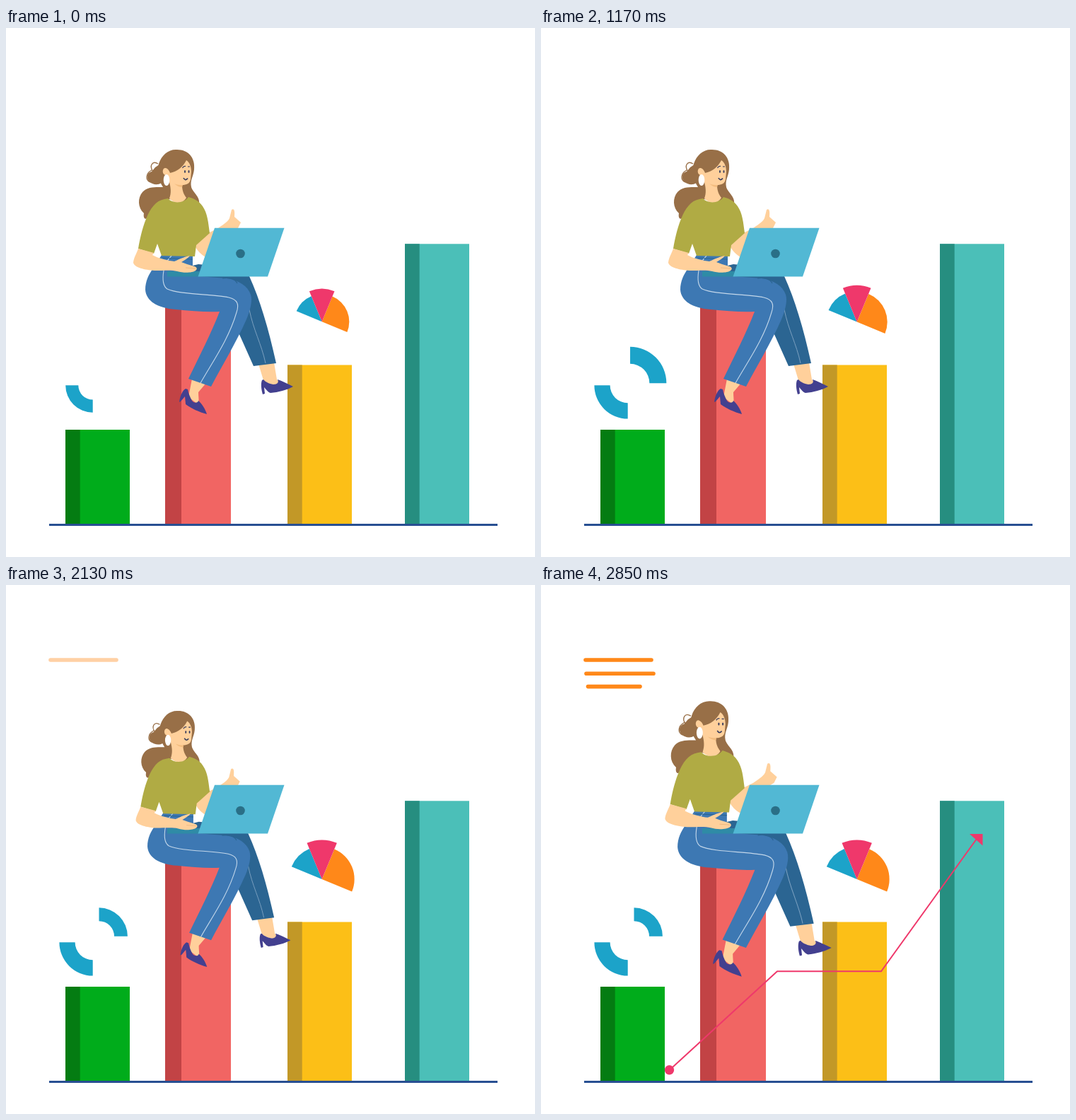
An HTML page with a canvas for the animation above (2.91 s loop, 748 by 748 pixels).

```html
<!DOCTYPE html>
<html lang="en">
<head>
<meta charset="utf-8">
<title>Growth chart</title>
<style>
html, body { margin: 0; width: 100%; height: 100%; overflow: hidden; background: #fff; }
canvas { display: block; }
</style>
</head>
<body>
<canvas id="stage" width="748" height="748"></canvas>
<script>
const ctx = document.getElementById('stage').getContext('2d');
const LOOP = 2910, STEP = 30, TAU = Math.PI * 2, DEG = Math.PI / 180;
const SKIN = '#ffd09b', HAIR = '#986f47', SHIRT = '#b0ab44', JEANS = '#3d78b3',
  DENIM = '#2b6592', SHOE = '#43408f', INK = '#34395c',
  BLUE = '#1ca3c9', PINK = '#ef386b', ORANGE = '#ff8819';

const clamp = v => Math.min(1, Math.max(0, v));
const ramp = (t, a, b) => clamp((t - a) / (b - a));

// Piecewise linear value through [time, value] points.
function track(t, keys) {
  const i = keys.findIndex(k => k[0] > t);
  if (i < 0) return keys[keys.length - 1][1];
  if (i === 0) return keys[0][1];
  const [[t0, v0], [t1, v1]] = [keys[i - 1], keys[i]];
  return v0 + (v1 - v0) * (t - t0) / (t1 - t0);
}

function rect(color, x, y, x2, y2) {
  ctx.fillStyle = color;
  ctx.fillRect(x, y, x2 - x, y2 - y);
}
function shape(color, d) {
  ctx.fillStyle = color;
  ctx.fill(new Path2D(d));
}
function stroke(color, width, d) {
  ctx.strokeStyle = color;
  ctx.lineWidth = width;
  ctx.stroke(new Path2D(d));
}
function oval(color, x, y, rx, ry = rx) {
  ctx.fillStyle = color;
  ctx.beginPath();
  ctx.ellipse(x, y, rx, ry, 0, 0, TAU);
  ctx.fill();
}
function zoom(x, y, scale, angle, draw) {
  ctx.save();
  ctx.translate(x, y);
  ctx.rotate(angle * DEG);
  ctx.scale(scale, scale);
  draw();
  ctx.restore();
}

// Ring or pie slice around the local origin; angles in degrees, blur softens its ends.
function slice(color, r0, r1, from, to, blur = 0) {
  const a = (from - blur) * DEG, b = (to + blur) * DEG;
  ctx.beginPath();
  ctx.arc(0, 0, r1, a, b);
  ctx.arc(0, 0, r0, b, a, true);
  ctx.closePath();
  ctx.fillStyle = color;
  if (blur) {
    const g = ctx.createConicGradient(a, 0, 0), span = to - from;
    g.addColorStop(0, color + '00');
    g.addColorStop(2 * blur / 360, color);
    g.addColorStop(span / 360, color);
    g.addColorStop((span + 2 * blur) / 360, color + '00');
    ctx.fillStyle = g;
  }
  ctx.fill();
}

function bar(x, y, side, dark, light) {
  rect(light, x, y, x + side.w, 702);
  rect(dark, x, y, x + side.d, 702);
}

function legs() {
  shape(SKIN, 'M357 475L379 473L383 497L388 501C384 506 373 506 364 498Z');
  shape(SHOE, 'M362 498C360 503 361 511 363 518L366 517L365 508C368 511 370 515 374 516C385 515 397 512 406 507C398 503 390 499 384 497C386 501 384 504 378 504C372 503 366 500 364 497Z');
  shape(DENIM, 'M264 336L272 334L282 335L344 351C359 384 371 424 382 474L350 478L329 431L300 380L264 352Z');
  stroke('#7ba0c0', 1, 'M344 398C350 428 361 446 367 474');
  shape(SKIN, 'M263 496L283 502L272 515C272 525 274 528 270 531L258 522Z');
  shape(SHOE, 'M254 510C250 512 246 520 245 529L247 528L253 521L254 532C262 538 273 543 284 546C282 539 277 531 272 527C271 531 265 530 263 527C260 522 258 516 257 511Z');
  shape(JEANS, 'M220 321L264 322L264 336L272 351L312 354C330 357 342 365 346 377C349 386 345 400 340 412C325 446 305 478 290 507L258 496C274 463 290 432 302 401C283 402 262 400 240 398C214 396 198 386 197 370C197 358 202 348 208 340Z');
  stroke(DENIM, 1.2, 'M306 354C316 352 324 355 327 361');
  stroke('#c3d7ea', 1.1, 'M234 322C228 328 224 335 223 343C221 355 222 365 228 369C245 377 290 376 315 381C327 384 330 390 326 402C315 440 292 472 275 502');
  stroke(DENIM, 1.2, 'M221 325L264 327');
}

function body() {
  shape(SKIN, 'M288 289L267 308C271 316 276 320 282 324L296 302L328 283L332 275L323 267C324 257 322 255 319 257L316 269C313 275 305 279 300 283Z');
  shape(HAIR, 'M240 172C256 171 268 182 266 200C265 210 260 215 262 225C265 234 275 238 273 250L255 246L230 242L205 258C201 274 193 272 195 262C186 254 186 240 193 232C200 224 212 225 222 225C215 215 213 200 216 192C220 180 229 172 240 172Z');
  shape(HAIR, 'M217 193L211 197L206 203C197 205 198 217 207 220C214 223 221 220 225 214L224 198Z');
  stroke(HAIR, 1.3, 'M215 192C207 187 202 195 208 203M206 201C197 206 197 215 204 218');
  shape(SKIN, 'M255 187C260 190 262 197 262 203L261 214C260 220 255 222 249 222C249 231 252 236 255 240C250 249 238 249 231 241C234 233 233 226 231 218L225 208C220 206 221 197 226 198C229 199 231 202 232 205C242 203 250 197 255 187Z');
  shape('#f3bd80', 'M238 220C242 222 246 222 250 222L249 225C245 225 241 223 238 220Z');
  oval('#fff', 227, 215, 4.3, 8);
  oval(INK, 253, 203, 1, 2);
  oval(INK, 258.5, 203, 1, 2);
  stroke(INK, 1.2, 'M249.5 198Q251 195 254 195.5M257 196L260 196');
  stroke(INK, 1.6, 'M251 212Q253.5 217 257 212.5');
  shape(SHIRT, 'M224 242C212 244 204 255 198 270C192 285 189 300 187 312L209 319L214 305L220 322L267 323L269 307L288 290C286 275 285 262 278 252C272 243 264 241 258 239C252 248 236 249 229 241Z');
}

function arm() {
  shape(SKIN, 'M187 312C185 318 180 326 180 332C182 339 196 342 210 343C225 343 235 342 242 344C252 347 264 346 268 343C271 341 270 338 266 337L256 334L248 331C253 328 258 325 260 322C250 324 243 328 238 330C230 329 216 326 207 321L209 318Z');
  stroke('#eab47a', .8, 'M254 339L268 340');
}

function woman(t) {
  const size = track(t, [[0, 1], [900, 1.0425], [1080, 1.014], [1170, 1], [1700, .917],
    [1830, .92], [2160, .973], [2400, 1.003], [2700, 1.041]]);
  const posed = part => zoom(292, 359.5, size, 0, () => {
    ctx.translate(-292, -359.5);
    part();
  });
  posed(legs);
  posed(body);
  shape('#2f8ba6', 'M228 344L274 344L272 351.5L228 351.5Z');
  posed(arm);
  shape('#52b8d4', 'M295 282.7L393.5 282.7L370 351.5L271.5 351.5Z');
  oval('#2a6f87', 331.5, 319, 6.3);
}

function ring(t) {
  const turn = Math.min(360, t * .46);
  const blur = t > 0 && turn < 360 ? 5 : 0;
  const r = Math.min(47.3, 38.5 + t * .01);
  zoom(122.7, 505.2, 1, turn, () => slice(BLUE, r * .53, r, 90, 180, blur));
  const pop = track(t, [[960, 0], [1170, 1.27], [1410, 1]]);
  if (pop > 0) zoom(151.7, 476.5, pop, 0, () => {
    ctx.translate(-20.2, 20.2);
    slice(BLUE, 21.5, 40.4, -90, 0);
  });
}

function pie(t) {
  const turn = 360 * ramp(t, 2259, 2849);
  const blur = turn > 0 && turn < 360 ? 6 : 0;
  zoom(446.7, 411.5, 1 + .19 * ramp(t, 0, 1950), turn, () => {
    ctx.translate(0, 3.7);
    slice(BLUE, 0, 39, 202.5, 247.5 + blur, blur);
    slice(ORANGE, 0, 38.6, 292.5 - blur, 382.5, blur);
    slice(PINK, 0, 46.5, 247.5, 292.5, blur / 3);
  });
}

function textLines(t) {
  ctx.lineCap = 'round';
  [[63, 156, 106], [64, 159, 125.3], [66.5, 140, 143.6]].forEach(([x, x2, y], i) => {
    const start = 2040 + i * 200;
    ctx.globalAlpha = ramp(t, start, start + 230);
    stroke(ORANGE, 5.6, `M${x} ${y}H${x2}`);
  });
  ctx.globalAlpha = 1;
  ctx.lineCap = 'butt';
}

function trend(t) {
  const length = (t - 2231) * .966;
  if (length <= 0) return;
  oval(PINK, 181.5, 685.7, 6.7);
  ctx.setLineDash([length, 2000]);
  stroke(PINK, 2, 'M181.5 686L334 546.3H481L616 359');
  ctx.setLineDash([]);
  if (length > 583) shape(PINK, 'M606 352H624.5V368.5Z');
}

function draw(t) {
  rect('#fff', 0, 0, 748, 748);
  const slim = { w: 91, d: 20.7 };
  bar(84, 568, slim, '#047c12', '#00ac1b');
  bar(225, 380, { w: 93, d: 23 }, '#c24345', '#f16563');
  bar(398, 476.5, slim, '#c29827', '#fcbf17');
  bar(564, 305.3, slim, '#268e80', '#4bbfb8');
  rect('#284f92', 61, 701, 695, 704);
  ring(t);
  pie(t);
  woman(t);
  textLines(t);
  trend(t);
}

const begin = performance.now();
function frame() {
  const t = (performance.now() - begin) % LOOP;
  draw(Math.floor(t / STEP) * STEP);
  requestAnimationFrame(frame);
}
frame();
</script>
</body>
</html>
```
